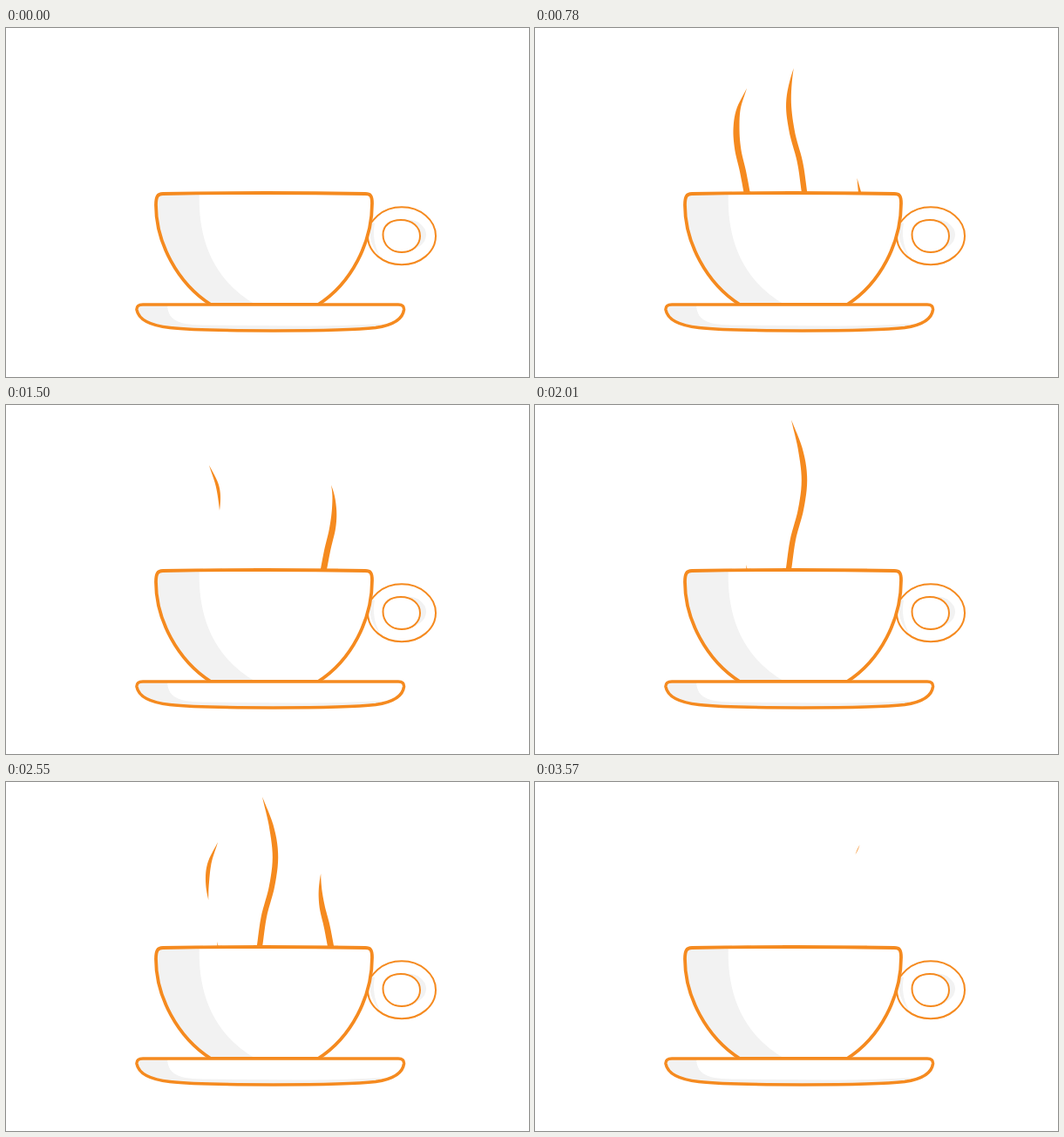
An HTML page that plays this animation: 600 px wide and 400 px high, repeating every 3.6 s.

```html
<!DOCTYPE html>
<html lang="en">
<head>
<meta charset="utf-8">
<title>Steaming cup</title>
<style>
  html, body { margin: 0; width: 100%; height: 100%; overflow: hidden; background: #fff; }
  svg { display: block; width: 600px; height: 400px; }
  .line { fill: none; stroke: #f58a1f; stroke-linejoin: round; }
  .shade { fill: #f2f2f2; }
</style>
</head>
<body>
<svg viewBox="0 0 600 400">
  <defs>
    <path id="cup" d="M235 317C197 293 172 246 172 203C172 193 174 190 180 190Q300 188 412 190C418 190 420 192 420 201C420 246 396 293 358 317Z"/>
    <path id="saucer" d="M157 317H450Q457 317 456.500 323C455 335 441 341 424 343.500C385 348 228 348 188 343.500C166 341 152 334 150 323Q149.500 317 157 317Z"/>
    <clipPath id="inCup"><use href="#cup"/></clipPath>
    <clipPath id="inSaucer"><use href="#saucer"/></clipPath>
  </defs>
  <g id="steam" fill="#f58a1f"></g>

  <g stroke-width="2">
    <ellipse class="line" cx="454" cy="238.300" rx="39" ry="33" style="fill:#fff"/>
    <path class="shade" d="M419 222Q413 245 430 263Q419 245 423 224Z"/>
    <ellipse class="shade" cx="460" cy="237" rx="22" ry="17.500"/>
    <path class="line" style="fill:#fff" d="M432.500 237C432.500 226 441 220 453 220C466 220 475 228 475 238.500C475 249 466 257 454 257C441 257 432.500 248 432.500 237Z"/>
  </g>

  <use href="#cup" fill="#fff"/>
  <path class="shade" clip-path="url(#inCup)" d="M165 185H222C219 245 240 292 290 319H165Z"/>
  <use href="#cup" class="line" stroke-width="3.800"/>

  <use href="#saucer" fill="#fff"/>
  <path class="shade" clip-path="url(#inSaucer)" d="M145 315H185C185 333 194 340 225 340.500L345 341.500Q395 341 430 339L420 350H145Z"/>
  <use href="#saucer" class="line" stroke-width="3.500"/>
</svg>
<script>
const LOOP = 3600, RISE = 260, LEAVE = 440, LIFE = 690;
const BASE = 188, STEPS = 32, TAPER = 55;

// Spine x positions, evenly spaced from the top to the rim
const middle = [294, 304.5, 309, 305, 296, 291];
const side = [243, 233.5, 231, 233, 238.5, 243];

const wisps = [
  { xs: middle, shift: 0, top: 17, axis: 300, half: 3.2,
    starts: [25, 565, 1645, 2185] },
  { xs: side, shift: 0, top: 69, axis: 238, half: 3.6,
    starts: [380, 920, 2000, 2540] },
  { xs: side, shift: 129.5, top: 72, axis: 368.5, half: 3.6,
    starts: [745, 1285, 2365, 2905] }
];

const steam = document.getElementById('steam');
const puffs = wisps.flatMap(wisp => wisp.starts.map((start, i) => {
  const path = document.createElementNS('http://www.w3.org/2000/svg', 'path');
  steam.append(path);
  return { wisp, start, mirrored: i === 1, path };
}));

const clamp = v => Math.max(0, Math.min(1, v));

function spline(xs, v) {
  const n = xs.length - 1;
  const i = Math.min(n - 1, Math.floor(v * n));
  const f = v * n - i;
  const b = xs[i], c = xs[i + 1];
  const a = i ? xs[i - 1] : 2 * b - c;
  const d = i + 2 <= n ? xs[i + 2] : 2 * c - b;
  return b + f / 2 * (c - a + f * (2 * a - 5 * b + 4 * c - d + f * (3 * (b - c) + d - a)));
}

function outline({ xs, shift, top, axis, half }, age, mirrored) {
  if (age <= 0 || age >= LIFE) return '';
  const height = BASE - top;
  const gone = clamp((age - LEAVE) / (LIFE - LEAVE));
  const from = BASE - height * clamp(age / RISE);
  const to = BASE - height * gone;
  const length = to - from;
  const pinch = clamp(gone / 0.18);
  const left = [], right = [];

  for (let i = 0; i <= STEPS; i++) {
    const part = i / STEPS;
    const y = from + length * part;
    const grown = half * Math.sin(Math.min(1, (y - from) / TAPER) * Math.PI / 2);
    const drop = 0.036 * length * Math.sin(Math.PI * part);
    const w = grown + (drop - grown) * pinch;
    let x = spline(xs, (y - top) / height) + shift;
    if (mirrored) x = 2 * axis - x;
    left.push(`${(x - w).toFixed(2)} ${y.toFixed(2)}`);
    right.unshift(`${(x + w).toFixed(2)} ${y.toFixed(2)}`);
  }
  return `M${left.concat(right).join('L')}Z`;
}

function draw(now) {
  const t = now % LOOP;
  for (const { wisp, start, mirrored, path } of puffs) {
    path.setAttribute('d', outline(wisp, t - start, mirrored));
  }
}

const began = performance.now();
function tick() {
  draw(performance.now() - began);
  requestAnimationFrame(tick);
}
tick();
</script>
</body>
</html>
```
